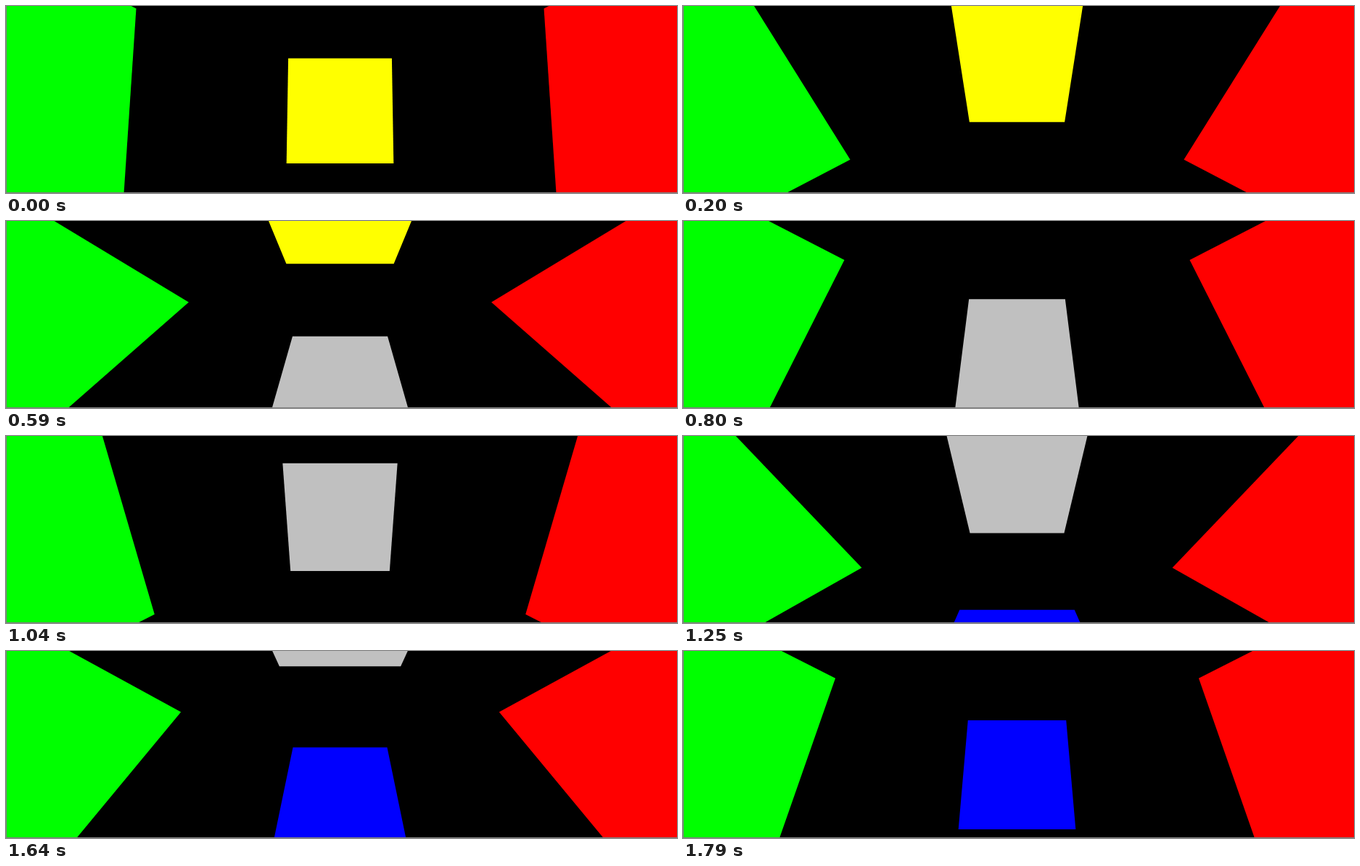
These frames come from a looping animation (925 by 259 pixels, 1.89 s). An HTML page with a canvas:

```html
<!DOCTYPE html>
<html lang="en">
<head>
<meta charset="utf-8">
<title>Rotating room</title>
<style>
  html, body { margin: 0; width: 100%; height: 100%; overflow: hidden; background: #000; }
  canvas { display: block; }
</style>
</head>
<body>
<canvas id="stage" width="925" height="259"></canvas>
<script>
const ctx = document.getElementById('stage').getContext('2d');
const CX = 460.5, CY = 139.2, FOCAL = 145.1, NEAR = 0.01;
const LOOP = 1890, LAST_STEP = 60, START = 0.0332, TURN = 0.05;

// The viewer sits in the middle of a room of square panels, each 2 wide and 2 away.
const wall = [[-1, -1, 2], [1, -1, 2], [1, 1, 2], [-1, 1, 2]];
const side = x => [[x, -1, -1], [x, -1, 1], [x, 1, 1], [x, 1, -1]];
const panels = [
  { color: '#0f0', points: side(-2), turn: 0 },
  { color: '#f00', points: side(2), turn: 0 },
  { color: '#ff0', points: wall, turn: 0 },
  { color: '#c0c0c0', points: wall, turn: Math.PI / 2 },
  { color: '#00f', points: wall, turn: Math.PI },
];

function pitch([x, y, z], angle) {
  const c = Math.cos(angle), s = Math.sin(angle);
  return [x, y * c + z * s, z * c - y * s];
}

// Keep only the part of a polygon in front of the viewer.
function clipNear(points) {
  const out = [];
  points.forEach((p, i) => {
    const q = points[(i + 1) % points.length];
    if (p[2] >= NEAR) out.push(p);
    if ((p[2] >= NEAR) !== (q[2] >= NEAR)) {
      const k = (NEAR - p[2]) / (q[2] - p[2]);
      out.push(p.map((v, j) => v + (q[j] - v) * k));
    }
  });
  return out;
}

function drawPanel({ color, points, turn }, angle) {
  ctx.beginPath();
  for (const [x, y, z] of clipNear(points.map(p => pitch(p, angle + turn)))) {
    ctx.lineTo(CX + FOCAL * x / z, CY + FOCAL * y / z);
  }
  ctx.fillStyle = color;
  ctx.fill();
}

// Steps of 30 ms with one shorter step near the start and a hold at the end.
function stepAt(t) {
  return Math.min(LAST_STEP, Math.floor((t < 100 ? t : t + 10) / 30));
}

function draw(t) {
  ctx.fillStyle = '#000';
  ctx.fillRect(0, 0, 925, 259);
  const angle = START - TURN * stepAt(t);
  panels.forEach(panel => drawPanel(panel, angle));
  ctx.fillStyle = '#808080';
  ctx.fillRect(0, 0, 1, 259);
  ctx.fillRect(0, 258, 925, 1);
}

const begin = performance.now();
function tick() {
  draw((performance.now() - begin) % LOOP);
  requestAnimationFrame(tick);
}
tick();
</script>
</body>
</html>
```
